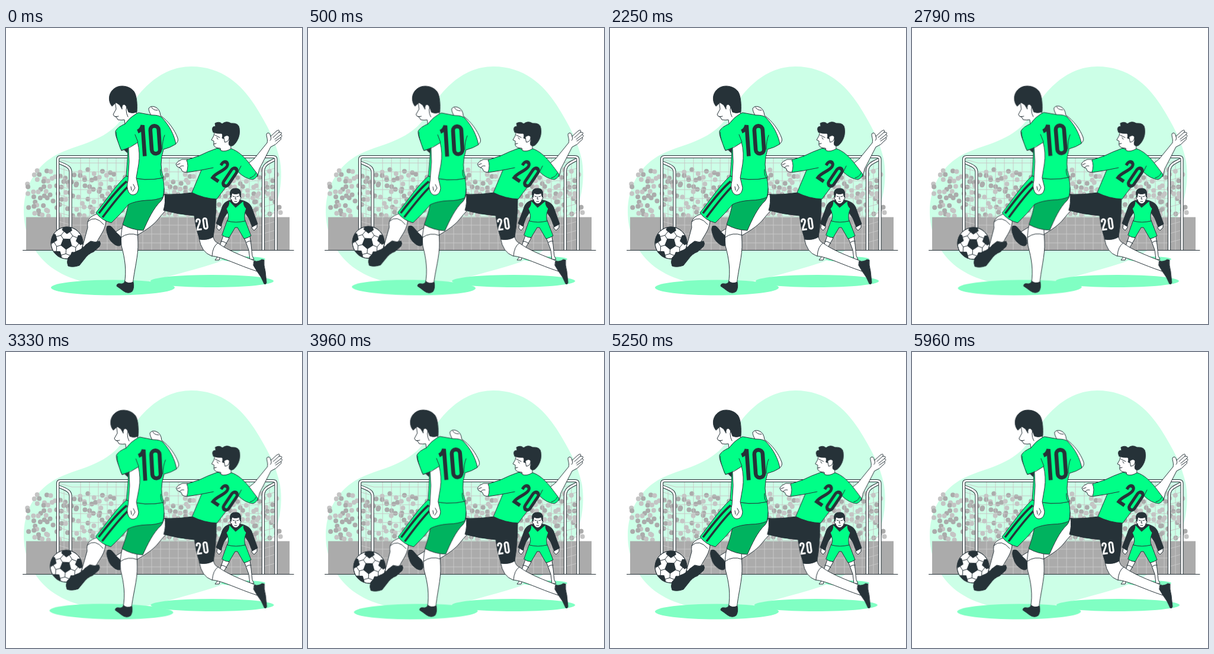
An HTML page that plays this animation: 500 by 500 pixels, repeating every 6000 ms.

```html
<!DOCTYPE html>
<html lang="en">
<head>
<meta charset="utf-8">
<title>Football match</title>
<style>
  html, body { margin: 0; width: 100%; height: 100%; overflow: hidden; background: #fff; }
  svg { display: block; width: 100vw; height: 100vh; }
  .ink { stroke: #263238; stroke-width: 1; stroke-linejoin: round; stroke-linecap: round; }
  .line { fill: none; }
  .skin { fill: #fff; }
  .kit { fill: #00ff87; }
  .shade { fill: #00b35f; }
  .dark { fill: #263238; }
  .shadow { fill: #80ffc3; }
  .stripe { fill: none; stroke-width: 3.6; stroke-linecap: butt; }
  .digits { fill: none; stroke: #263238; stroke-width: 5.3; stroke-linejoin: miter; }
  .frame-out { fill: none; stroke: #263238; stroke-width: 5.2; }
  .frame-in { fill: none; stroke: #fff; stroke-width: 3.2; }
  #striker { transform-origin: 183px 275px; animation: wind 1.5s linear infinite; }
  #defender { animation: shake 6s linear infinite; }
  @keyframes wind {
    0%, 100% { transform: rotate(0deg); }
    25% { transform: rotate(1deg); }
    75% { transform: rotate(-1deg); }
  }
  @keyframes shake {
    0%, 100% { transform: translateX(0); }
    10%, 90% { transform: translateX(-1px); }
    20%, 80% { transform: translateX(2px); }
    30%, 50%, 70% { transform: translateX(-4px); }
    40%, 60% { transform: translateX(4px); }
  }
</style>
</head>
<body>
<svg viewBox="0 0 500 500">
  <defs>
    <path id="two" d="M-5 -7V-10.5A5 5 0 0 1 5 -10.5C5 -2 -5 6 -5 15.2H7.5"/>
    <rect id="zero" x="-5" y="-15.5" width="10" height="31" rx="5"/>
    <g id="twenty"><use href="#two" x="-10"/><use href="#zero" x="10"/></g>
    <path id="backPosts" d="M87 226C97 231 109 233 109 243V375M456 221C443 228 434.500 230 434.500 243V375"/>
    <path id="goalFrame" d="M87.500 375.500V222Q87.500 217.500 92 217.500H451Q456 217.500 456 222V375.500"/>
    <clipPath id="ballClip"><circle cx="103" cy="363" r="27"/></clipPath>
  </defs>

  <path fill="#ccffe7" d="M313 65C365 65 398 96 420 130C440 162 456 190 463 225C470 270 455 320 428 350C400 380 370 393 335 403C290 416 255 425 215 434C160 440 104 428 70 399C44 376 30 345 30 310C30 270 48 237 80 217C112 198 150 197 184 167C206 146 214 118 242 94C262 76 286 65 313 65Z"/>
  <g id="crowd"></g>
  <rect x="34" y="319.500" width="445" height="56" fill="#ababab"/>
  <path id="net" fill="none" stroke="#c7c7c7"/>
  <use href="#backPosts" class="frame-out"/>
  <use href="#backPosts" class="frame-in"/>
  <use href="#goalFrame" class="frame-out"/>
  <use href="#goalFrame" class="frame-in"/>
  <path class="ink" d="M28.500 375.500H486"/>

  <g id="keeper" class="ink">
    <ellipse class="shadow" stroke="none" cx="401" cy="390.500" rx="37" ry="4.500"/>
    <path class="skin" d="M367 351L361 368L357 387L353 392L360 392L366 374L377 355ZM403 356L410 375L412 391L419 391L416 385L414 366L412 352Z"/>
    <path class="line" d="M363 360Q368 360 373 364M406 362Q410 359 414 360"/>
    <path class="skin" d="M357 331L356 338L360 342L364 337L364 332ZM416 332L415 338L419 342L424 337L424 331Z"/>
    <path class="dark" d="M379 291C369 293 366 299 364 306L355 330L363 335L368 321L376 309H402L410 321L416 336L425 331L416 306C414 299 410 294 398 291Z"/>
    <path class="kit" d="M374 325Q388 329 404 325L414 351Q408 355 402 356L391 337H387L377 354Q370 354 365 350Z"/>
    <path class="kit" d="M377 292Q377 301 372 305Q378 317 374 326Q388 330 404 326Q401 317 406 305Q401 301 401 292L388 303Z"/>
    <path class="skin" d="M380 277L380 284Q378 283 379 288L381 290L382 293Q388 301 394 293L395 290L397 287Q397 283 395 284L395 277Z"/>
    <path class="dark" d="M380 286C377 279 378 271 387 271C396 270 398 277 396 286L394 279Q387 282 382 279Z"/>
    <path class="line" d="M383 284L386 285M390 285L393 284M388 285L387 289L389 289M386 293H390"/>
  </g>

  <g id="defender">
    <ellipse class="shadow" cx="348" cy="427.500" rx="104" ry="10.500"/>
    <g class="ink">
      <path class="skin" d="M270 281C252 281 240 300 225 320L184 345L196 364C218 352 244 339 256 324Q264 314 270 308Z"/>
      <path class="dark" d="M171 335Q176 332 181 339L188 347Q197 353 195 364Q193 371 184 366Q174 359 172 350Q168 340 171 335Z"/>
      <path class="skin" d="M326 355Q330 379 347 385C367 387 390 400 424 411L422 394C400 385 375 376 359 364Q351 361 350 352Z"/>
      <path class="line" d="M358 363Q349 369 348 385"/>
      <path class="dark" d="M419 394Q427 395 432 391L436 392Q435 400 438 411L440 430Q439 434 436 432Q432 421 424 411L418 401Z"/>
      <path class="dark" d="M268 281Q291 282 315 278L355 288Q355 323 350 353Q340 359 327 357Q320 338 318 317Q291 315 266 308Q270 295 268 281Z"/>
      <path class="skin" d="M409 229L419 221L441 194C443 187 438 180 441 178Q445 175 447 183L457 174Q463 170 461 176Q468 176 464 180Q468 182 464 185Q466 188 461 191Q457 197 447 201L428 238L425 251L414 246Z"/>
      <path class="line" d="M461 176L451 185M464 180L454 188M464 185L455 191M447 183Q449 188 446 190"/>
      <path class="skin" d="M307 222L297 222Q289 225 287 230Q288 235 293 236Q296 236 297 241Q301 245 308 243Z"/>
      <path class="line" d="M293 236Q294 232 300 233M289 231L294 229"/>
      <path class="kit" d="M357 203Q340 209 326 216L305 223Q309 232 305 244L330 240L314 278Q334 288 356 289Q375 263 392 243Q404 255 417 256Q424 253 425 247C413 232 399 208 377 203Q366 208 357 203Z"/>
      <path class="line" d="M330 240L350 236M392 243L397 233M422 245Q419 252 412 253"/>
      <path class="skin" d="M353 173L351 182L347 189L351 191L351 198Q353 203 362 203L363 207Q370 210 380 204L379 188L372 174Z"/>
      <path class="dark" d="M350 176Q347 170 350 167L354 166L353 161Q360 157 365 162Q372 156 380 161Q393 160 394 169Q396 181 390 191Q384 201 379 199Q375 198 377 191Q378 182 371 183L368 187L365 186Q367 180 364 178Q357 179 350 176Z"/>
      <path class="skin" d="M368 184Q374 179 377 184Q377 192 370 193Z"/>
      <path class="line" d="M353 181L361 185M356 185L358 188M351 196L355 195"/>
    </g>
    <use href="#twenty" class="digits" transform="translate(370.500 246.500) rotate(34) scale(.96 1.12)"/>
    <use href="#twenty" class="digits" transform="translate(331 331) rotate(-8) scale(.57)" style="stroke:#fff"/>
  </g>

  <g id="striker">
    <ellipse class="shadow" cx="180.500" cy="438.500" rx="104.500" ry="13"/>
    <circle class="ink skin" cx="103" cy="363" r="27"/>
    <g id="patches" class="ink" clip-path="url(#ballClip)"></g>
    <circle class="ink line" cx="103" cy="363" r="27"/>
    <g class="ink">
      <path class="skin" d="M197 333Q193 350 195 368C201 390 204 410 200 432L214 435C216 410 224 385 223 362L222 338Z"/>
      <path class="line" d="M194 354Q207 344 223 350"/>
      <path class="dark" d="M201 428Q207 433 215 429Q217 439 213 445Q206 450 198 444Q193 440 187 436Q187 431 193 432Q199 433 201 428Z"/>
      <path class="skin" d="M154 314C142 318 136 324 138 337Q134 352 129 370L150 370C157 350 166 347 169 327Z"/>
      <path class="line" d="M138 327Q151 315 165 332"/>
      <path class="dark" d="M135 366L143 360Q151 363 158 360Q161 364 158 369L148 378Q139 381 132 391L124 401Q113 405 105 402Q102 396 105 388Q110 381 119 377Q129 374 135 366Z"/>
      <path class="skin" d="M246 149Q241 141 241 136Q244 131 251 133Q260 136 261 148C274 157 285 172 290 186Q292 192 286 196L270 194Z"/>
      <path class="line" d="M246 134Q248 139 256 139"/>
      <path class="shade" d="M204 290L267 270Q268 285 262 292C249 304 240 324 232 342Q212 341 197 332Q203 316 207 297Z"/>
      <path class="kit" d="M203 250Q234 260 265 253Q269 271 265 286Q253 291 238 291Q219 292 207 298Q194 314 178 329Q161 325 152 312C170 290 185 266 203 250Z"/>
      <path class="stripe" d="M204 259C190 270 172 293 157 313M207 267C193 280 178 300 163 320"/>
      <path class="dark" d="M200 206L208 203L207 212Z"/>
      <path class="kit" d="M201 162Q211 147 224 143L246 147Q260 147 264 152C276 165 284 180 287 196Q278 202 266 205Q258 231 266 253Q234 260 203 250Q205 226 206 203L195 207C191 193 184 184 185 174Q189 167 201 162Z"/>
      <path class="line" d="M264 205Q264 190 268 181M261 239Q260 248 264 253"/>
      <path class="skin" d="M207 198Q215 197 222 192Q227 211 224 230L220 253L224 270Q223 279 218 281Q211 284 207 277Q203 269 206 258L208 226Z"/>
      <path class="kit" d="M190 168Q184 179 193 205Q209 203 223 193L218 178" stroke="none"/>
      <path class="line" d="M186 176Q185 184 195 207Q210 203 223 193L218 180M215 264L218 270L214 276M211 268L212 274"/>
      <path class="skin" d="M184 122L186 137L181 146Q182 150 186 150L189 155Q195 156 200 155L201 162Q209 151 221 144L207 124Z"/>
      <path class="dark" d="M179 132C172 124 173 110 182 103C191 95 208 97 216 107C221 114 222 130 221 142Q213 145 207 142L203 131L196 137L192 130Q189 128 186 126Z"/>
      <path class="skin" d="M196 137Q195 129 200 129Q205 132 203 138Q203 145 206 150"/>
      <path class="line" d="M185 150L190 149"/>
    </g>
    <g class="digits" style="stroke-width:6.600" transform="translate(242 189.500) rotate(-4)">
      <path d="M-18.500 -16Q-12 -18 -9.500 -26V26.500"/>
      <rect x="3" y="-23.500" width="14" height="47" rx="7"/>
    </g>
  </g>
</svg>
<script>
  const NS = "http://www.w3.org/2000/svg";
  const $ = id => document.getElementById(id);
  const add = (parent, tag, attrs) => {
    const node = document.createElementNS(NS, tag);
    for (const key in attrs) node.setAttribute(key, attrs[key]);
    parent.append(node);
  };

  let seed = 71;
  const rand = () => (seed = seed * 16807 % 2147483647) / 2147483647;

  // Crowd: a jittered grid of heads in two greys
  for (let row = 0; row < 9; row++) {
    for (let col = 0; col < 46; col++) {
      const x = 36 + col * 9.5 + (rand() - .5) * 9;
      const y = 242 + row * 9 + (rand() - .5) * 8;
      const pale = rand() < .5;
      const skip = rand() < (row ? .22 : .5);
      if (skip || x < 35 || x > 465) continue;
      add($("crowd"), "circle", {
        cx: x.toFixed(1), cy: y.toFixed(1), r: 4,
        fill: pale ? "#c4c4c4" : "#ababab"
      });
    }
  }

  // Goal net, with slanted side panels
  let net = "";
  for (let x = 126; x < 432; x += 15) net += `M${x} 220V375`;
  for (let y = 228; y < 375; y += 15) net += `M90 ${y - 6}L111 ${y}H432L454 ${y - 6}`;
  net += "M98 230V375M445 228V375";
  $("net").setAttribute("d", net);

  // Ball: one centre pentagon, five at the rim, seams between
  const polar = (cx, cy, r, deg) => {
    const a = deg * Math.PI / 180;
    return [cx + r * Math.cos(a), cy + r * Math.sin(a)];
  };
  const pentagon = (cx, cy, r, turn) =>
    add($("patches"), "polygon", {
      class: "dark",
      points: [0, 1, 2, 3, 4].map(i => polar(cx, cy, r, turn + i * 72)).join(" ")
    });
  const [bx, by] = [102, 364.5];
  const turn = -51;
  pentagon(bx, by, 9.5, turn);
  for (let i = 0; i < 5; i++) {
    const a = turn + i * 72;
    const fork = polar(bx, by, 17, a);
    add($("patches"), "path", {
      class: "line",
      d: `M${polar(bx, by, 9, a)}L${fork}M${polar(bx, by, 21, a - 22)}L${fork}L${polar(bx, by, 21, a + 22)}`
    });
    pentagon(...polar(bx, by, 25.5, a + 36), 8.5, a);
  }
</script>
</body>
</html>
```
